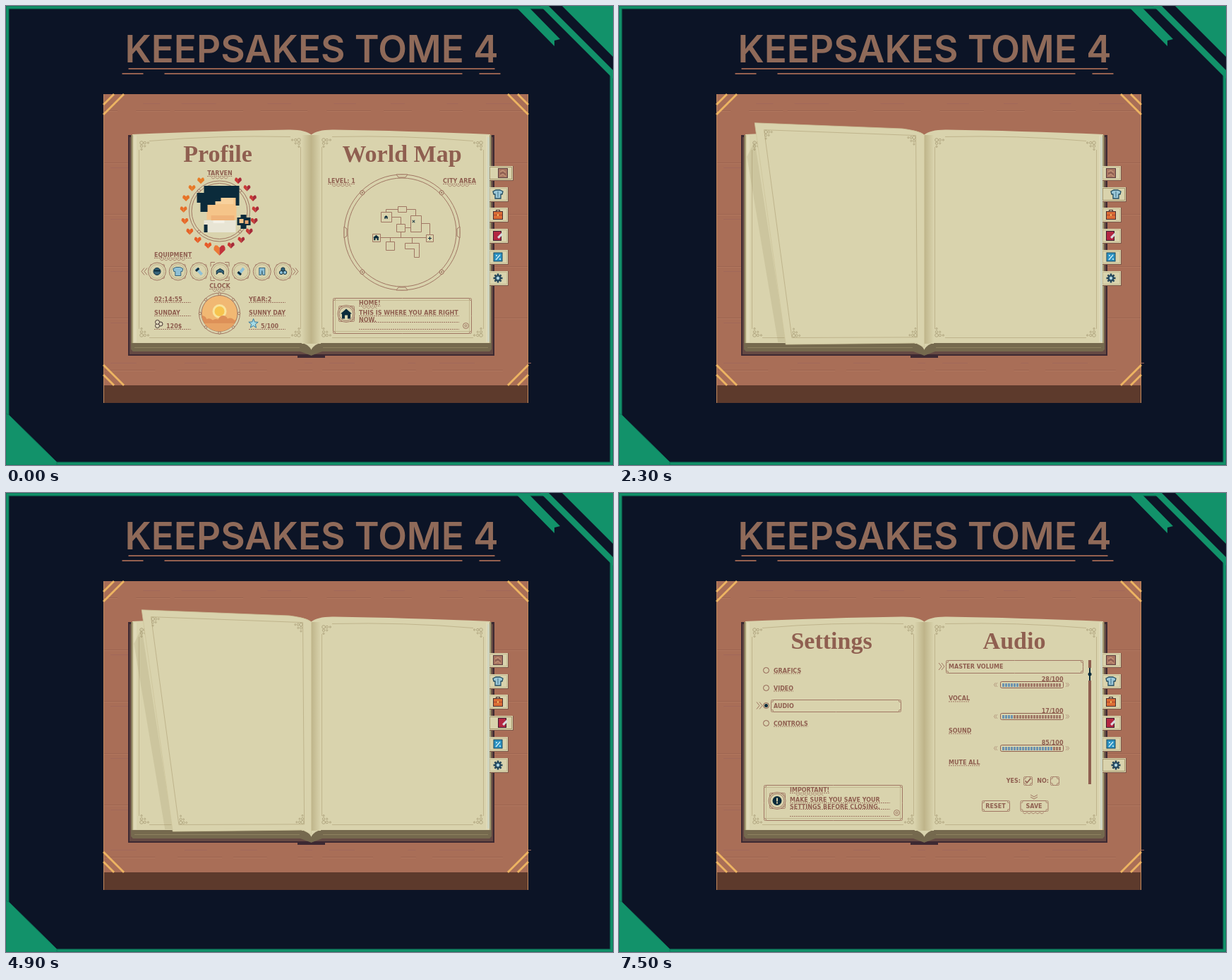
Recreate the animation shown at these times as an HTML page with a canvas. Size 860 by 651 pixels, loop 8000 ms.

```html
<!DOCTYPE html>
<html lang="en">
<head>
<meta charset="utf-8">
<title>Book menu</title>
<style>
html, body { margin: 0; width: 100%; height: 100%; overflow: hidden; background: #0c1426; }
canvas { display: block; width: 100%; height: 100%; }
</style>
</head>
<body>
<canvas id="stage" width="860" height="651"></canvas>
<script>
const g = document.getElementById('stage').getContext('2d');
const INK = '#8f5f50', RULE = '#a07663', PAPER = '#d9d3ad', FAINT = '#bfb48c', DARK = '#0b2b3b',
  GREEN = '#12926a', NIGHT = '#0c1426', GOLD = '#edb462', STEEL = '#36647a', SKY = '#8fc0d6';
const LOOP = 8000, PERIOD = 1300, FIRST = 500, STEP = 100, TURN = 8;
const MID = 432.5, TAU = Math.PI * 2;

// ---------- helpers ----------
const rect = (x, y, w, h, c) => { g.fillStyle = c; g.fillRect(x, y, w, h); };
const times = (n, fn) => { for (let i = 0; i < n; i++) fn(i); };
const polar = (x, y, r, a) => [x + r * Math.cos(a), y + r * Math.sin(a)];
// Runs draw for each quarter turn around x, y.
const quarters = (x, y, draw) => times(4, k => at(x, y, draw, 1, 1, k * TAU / 4));
// Runs draw for the four mirror images around x, y.
const mirrors = (x, y, draw) => times(4, k => at(x, y, draw, k % 2 ? -1 : 1, k > 1 ? -1 : 1));

function at(x, y, draw, sx = 1, sy = sx, turn = 0) {
  g.save(); g.translate(x, y); g.rotate(turn); g.scale(sx, sy); draw(); g.restore();
}
function paint(fill, edge, w = 1) {
  if (fill) { g.fillStyle = fill; g.fill(); }
  if (edge) { g.strokeStyle = edge; g.lineWidth = w; g.stroke(); }
}
function trace(p) {
  g.beginPath();
  for (let i = 0; i < p.length; i += 2) g.lineTo(p[i], p[i + 1]);
}
function line(p, c = RULE, w = 1) { trace(p); paint(null, c, w); }
function poly(p, fill, edge, w) { trace(p); g.closePath(); paint(fill, edge, w); }
function disc(x, y, r, fill, edge, w) { g.beginPath(); g.arc(x, y, r, 0, TAU); paint(fill, edge, w); }
// Closes the right half of a symmetric outline with its mirror image.
function both(half) {
  const p = [...half];
  for (let i = half.length - 2; i >= 0; i -= 2) p.push(-half[i], half[i + 1]);
  return p;
}
function random(seed) {
  return () => (seed = seed * 16807 % 2147483647) / 2147483647;
}
function dots(x, y, w) {
  g.setLineDash([2, 1]); line([x, y + .5, x + w, y + .5], RULE); g.setLineDash([]);
}
function wave(x, y, w) {
  const p = [];
  times(w / 3, i => p.push(x + i * 3, y + i % 2 * 2));
  line(p, RULE, .8);
}
// Small label, y is the middle of the capitals; rule: 1 dotted, 2 dotted and waved.
function label(s, x, y, align = 'left', rule = 0) {
  g.font = 'bold 8px "DejaVu Sans", sans-serif';
  g.textAlign = align; g.fillStyle = INK;
  g.fillText(s, x, y + 3);
  const w = g.measureText(s).width;
  const left = x - (align === 'center' ? w / 2 : align === 'right' ? w : 0);
  if (rule) dots(left, y + 4, w);
  if (rule > 1) wave(left + w * .15, y + 6, w * .7);
}
function title(s, x) {
  g.font = 'bold 34px "Liberation Serif", "Times New Roman", serif';
  g.textAlign = 'center'; g.fillStyle = INK;
  g.fillText(s, x, 221);
}
// Frame with cut corners and a small ring in each.
function box(x, y, w, h) {
  const cx = x + w / 2 + .5, cy = y + h / 2 + .5, a = w / 2, b = h / 2;
  mirrors(cx, cy, () => {
    line([0, b, a - 3, b, a, b - 3, a, 0]);
    disc(a - 1.5, b - 1.5, 1.5, PAPER, RULE, .8);
  });
}
function chevrons(x, y, dir = 1, s = 1) {
  at(x, y, () => times(2, k => line([k * 4, -5, k * 4 + 4, 0, k * 4, 5])), dir * s, s);
}

// ---------- scenery ----------
function backdrop() {
  rect(0, 0, 860, 651, NIGHT);
  g.strokeStyle = '#0d6852'; g.lineWidth = 5; g.strokeRect(2, 2, 856, 647);
  g.strokeStyle = GREEN; g.lineWidth = 3; g.strokeRect(2, 2, 856, 647);
  poly([0, 578, 4, 580, 72, 647, 72, 651, 0, 651], GREEN, '#0d7a5c');
  poly([724, 3, 742, 3, 785, 47, 777, 49, 777, 57], GREEN);
  const slant = (x, c) => poly([x, 0, 860, 0, 860, 860 - x], c);
  slant(757, GREEN); slant(769, NIGHT); slant(788, GREEN);

  g.font = '600 53px Inter, sans-serif';
  g.textAlign = 'center'; g.fillStyle = '#8f6a59';
  g.fillText('KEEPSAKES TOME 4', 433, 80);
  at(432.5, 0, () => {
    const c = '#94604f';
    rect(-259, 88, 519, 2, c);
    rect(-208, 95, 422, 2, c);
    for (const side of [-1, 1]) rect(side * 253 - 15, 95, 30, 2, c);
  });
}
function desk() {
  const rnd = random(11);
  rect(138, 125, 602, 438, '#a96e57');
  times(6, k => {
    const y = Math.round(148 + k * 73.5), edge = k % 5 === 0;
    for (let x = 138; x < 735;) {
      const w = edge ? 20 + rnd() * 90 : 602;
      rect(x, y, Math.min(w, 740 - x), 1, '#9c6450');
      rect(x, y + 1, Math.min(w, 740 - x), 1, '#b2775e');
      rect(x + 10, y + (edge ? -10 : 7), Math.min(w * .5, 730 - x), 1, '#a1685a');
      x += w + 4 + rnd() * 50;
    }
  });
  rect(138, 538, 602, 25, '#5d3a2c');
  for (const x of [138, 739]) rect(x, 125, 1, 438, '#c48a5c');
  mirrors(439, 331.5, () => {
    for (const d of [15, 29]) line([301 - d, 206.5, 301, 206.5 - d], GOLD, 2.8);
  });
}
// Rings packed into a corner, shrinking outwards.
function ornament(x, y, sx, sy) {
  at(x, y, () => times(3, i => times(3 - i, j =>
    disc(3 + i * 4.7, 3 + j * 4.7, 2.3 - (i + j) * .6, null, '#aca17b', .9))), sx, sy);
}
function halfBook() {
  rect(173, 183, 260, 313, '#3d2932');
  rect(175, 186, 258, 308, '#654943');
  rect(413, 494, 20, 5, '#3d2932');
  poly([177, 183, 433, 183, 433, 496, 417, 490, 180, 490, 177, 487], '#75694e');
  rect(182, 484, 234, 1, '#8d8160');
  g.beginPath();
  g.moveTo(179, 182);
  g.quadraticCurveTo(300, 177, 400, 175.5);
  g.quadraticCurveTo(424, 175, 433, 183);
  g.lineTo(433, 488);
  g.quadraticCurveTo(428, 479, 418, 478);
  g.lineTo(179, 478);
  paint(PAPER);
  rect(178, 183, 2, 295, '#a59a73'); rect(181, 184, 4, 293, '#dfd9b7');
  const gutter = g.createLinearGradient(419, 0, 433, 0);
  gutter.addColorStop(0, PAPER); gutter.addColorStop(1, '#bdb388');
  rect(419, 183, 14, 296, gutter);
  g.beginPath();
  g.moveTo(203, 191.5); g.quadraticCurveTo(300, 183, 403, 185.5);
  g.moveTo(417.5, 200); g.lineTo(417.5, 458);
  g.moveTo(403, 470.5); g.lineTo(203, 470.5);
  g.moveTo(188.5, 458); g.lineTo(188.5, 204);
  paint(null, FAINT);
  for (const [x, top, sx] of [[189, 191, 1], [418, 187, -1]]) {
    ornament(x, top, sx, 1); ornament(x, 470, sx, -1);
  }
}
function book() {
  halfBook();
  at(MID * 2, 0, halfBook, -1, 1);
  rect(682, 186, 3, 290, '#cfd5c0');
}

// ---------- icons, drawn around 0,0 ----------
const shirt = both([3, -6, 7, -4, 6, 0, 4, 0, 4, 6]);
const house = () => poly(both([0, -7, 8, 0, 6, 0, 6, 7, 2, 7, 2, 2]), DARK);
function gear() {
  times(4, k => at(0, 0, () => rect(-1.3, -6.5, 2.6, 13, '#25465a'), 1, 1, k * TAU / 8));
  disc(0, 0, 4.5, '#25465a'); disc(0, 0, 2.4, SKY); disc(0, 0, 1, '#e6edde');
}
function tile(fill, edge, a = 6, b = a) {
  rect(-a - 1, -b - 1, a * 2 + 2, b * 2 + 2, edge);
  rect(-a, -b, a * 2, b * 2, fill);
}
const TABS = [
  () => {
    tile('#a87561', '#5b3c3e');
    times(3, k => line([-4, k * 3 - 2, 0, k * 3 - 4, 4, k * 3 - 1], k % 2 ? '#744a44' : '#cfa283'));
  },
  () => { poly(shirt, '#9cc8d8', '#234c60', 1.3); rect(-.5, -4, 1, 8, '#3c7188'); },
  () => {
    rect(-3, -7, 6, 3, '#4a2d2f'); rect(-2, -6, 4, 2, PAPER);
    at(0, 1, () => tile('#db6c35', '#4a2d2f', 6, 5));
    rect(-6, 0, 12, 1, '#a8482c'); rect(-1, -1, 2, 3, '#f1b25c');
  },
  () => {
    at(-1, 0, () => tile('#b32742', '#3d1b30', 5, 6));
    at(3, 0, () => rect(-1.5, -4, 3, 8, '#d9dbe0'), 1, 1, TAU / 8);
  },
  () => {
    tile('#2d93c3', '#17445f', 5.5);
    line([-3, 4, 3, -3], '#d6eef4', 1.3);
    for (const d of [-3, 2]) rect(d, d, 2, 2, '#a8dcec');
  },
  gear
];
function tabs(active) {
  TABS.forEach((icon, k) => {
    const y = Math.round(237 + k * 29.7), out = k === active ? 7 : 0;
    rect(685, y - 10, 27 + out, 21, '#7d5748');
    rect(685, y - 10, 26 + out, 20, PAPER);
    g.strokeStyle = out ? '#a8986f' : '#c6bb92'; g.lineWidth = 1;
    g.strokeRect(685.5, y - 8.5, 24 + out, 17);
    at(697 + out, y, icon);
  });
}
const blade = turn => () => at(0, 0, () => { rect(-2, -6, 4, 12, SKY); rect(-3, 2, 6, 3, DARK); }, 1, 1, turn);
const GEAR = [
  () => { disc(0, 0, 5, STEEL, DARK); rect(-4, -2, 8, 2, DARK); },
  () => poly(shirt, SKY, STEEL),
  blade(2.4),
  () => poly(both([0, -4, 5, -1, 5, 4, 2, 1]), STEEL, DARK),
  blade(.7),
  () => poly(both([0, -5, 4, -5, 4, 5, 1, 5, 0, -1]), SKY, STEEL),
  () => times(3, k => disc(...polar(0, 0, 3, k * TAU / 3 - 1.6), 2.6, k ? SKY : STEEL, DARK))
];
function heart(x, y, left, right, s) {
  at(x, y, () => [left, right].forEach((c, k) =>
    at(0, 0, () => poly([0, -2, 2, -4, 4, -4, 5, -2, 5, 0, 0, 5], c), k ? 1 : -1, 1)), s);
}
function panel(x, icon, head, a, b) {
  box(x, 414, 196, 50);
  g.strokeStyle = FAINT; g.lineWidth = .8; g.strokeRect(x + 3.5, 417.5, 190, 44);
  box(x + 8, 425, 22, 22);
  for (const r of [12, 10]) disc(x + 19, 436.5, r, PAPER, RULE);
  at(x + 19, 436.5, icon);
  label(head, x + 37, 421, 'left', 2);
  label(a, x + 37, 435); label(b, x + 37, 445);
  times(3, k => dots(x + 37, 439 + k * 9.5 | 0, 142));
  for (const r of [4, 1.5]) disc(x + 188.5, 453.5, r, null, RULE);
}

// ---------- pages ----------
function portrait(cx, cy) {
  for (const r of [43, 39.5]) disc(cx, cy, r, PAPER, RULE);
  quarters(cx, cy, () => disc(29, 29, 2, PAPER, RULE));
  at(cx, cy, () => {
    rect(-18, -20, 42, 32, '#f5c489'); rect(-6, -20, 26, 10, '#f8d19c'); rect(-12, 6, 33, 9, '#efb37a');
    rect(-22, 13, 45, 17, '#e8e5d5'); rect(-22, 19, 5, 11, DARK); rect(-9, 13, 16, 4, '#f4f1e5');
    poly([-22, -36, 28, -36, 28, -8, 23, -8, 23, -19, 2, -19, 2, -14, -6, -14, -6, -9, -17, -9,
      -17, 1, -27, 1, -27, -12, -32, -12, -32, -26, -22, -26], DARK);
    rect(25, 9, 19, 11, DARK); rect(30, 5, 8, 20, DARK);
    rect(28, 11, 6, 6, '#f5c489'); rect(36, 13, 5, 5, '#e5a36d');
  });
  for (let k = 1; k < 9; k++) {
    const [x, y] = polar(cx, cy, 51, TAU / 4 + k * .3246), warm = `hsl(${14 + k * 1.6} 80% 53%)`;
    heart(x, y, warm, warm, .95);
    heart(2 * cx - x, y, '#c93a36', '#a62b39', .95);
  }
  heart(cx, cy + 55, '#ec7836', '#c2323a', 1.6);
}
function clock(x, y) {
  disc(x, y, 29, PAPER, RULE);
  times(8, k => disc(...polar(x, y, 27.5, k * TAU / 8), 1.8, PAPER, RULE));
  disc(x, y, 25.5, '#f1b873', RULE);
  g.save();
  g.clip();
  disc(x, y - 3, 10, '#f8e39c'); disc(x, y - 3, 7, '#f6c44e');
  times(6, k => disc(x - 25 + k * 10, y + 13 - 3 * Math.cos(k * 2), 7, '#dd9058'));
  rect(x - 26, y + 14, 52, 13, '#e7a365');
  g.restore();
}
function profile() {
  title('Profile', 300);
  label('TARVEN', 303, 237, 'center', 2);
  portrait(302.5, 291);
  label('EQUIPMENT', 210, 353, 'left', 2);
  GEAR.forEach((draw, k) => {
    const x = 214 + k * 29.75;
    box(x - 10, 366, 20, 20);
    disc(x, 376.5, 12.5, PAPER, RULE); disc(x, 376.5, 10, null, FAINT);
    at(x, 376.5, draw);
  });
  mirrors(303, 376.5, () => line([7, 13, 13, 13, 13, 7]));
  chevrons(200, 376.5, -1); chevrons(406, 376.5);
  label('CLOCK', 303, 397, 'center', 2);
  clock(302.5, 436);
  const facts = [['02:14:55', 'SUNDAY', '120$'], ['YEAR:2', 'SUNNY DAY', '5/100']];
  facts.forEach((list, i) => list.forEach((s, k) => {
    const x = 210 + i * 134, y = 416 + k * 19;
    label(s, x + (k > 1 ? 17 : 0), y); dots(x, y + 4, 52);
  }));
  times(3, k => disc(...polar(216, 451, 3, k * TAU / 3), 3, '#dfd8bc', '#43322e'));
  const star = [];
  times(10, k => star.push(...polar(350.5, 450.5, k % 2 ? 3 : 7, k * TAU / 10 - .3)));
  poly(star, '#a5dbe6', '#397b9d');
}
// Rooms as x, y, w, h; a link runs along from its first room, then up or down to its second.
const ROOMS = {
  A: [519, 323, 11, 11], B: [538, 334, 12, 12], C: [531, 292, 15, 14], D: [555, 284, 12, 8],
  E: [573, 297, 15, 23], F: [553, 309, 12, 11], G: [595, 324, 10, 10], H: [565, 336, 20, 8]
};
const LINKS = ['DC', 'DE', 'CF', 'FE', 'EG', 'AG', 'AF', 'AB', 'AH'];
function worldMap() {
  title('World Map', 561);
  label('LEVEL: 1', 456, 248, 'left', 2);
  label('CITY AREA', 666, 248, 'right', 2);
  for (const r of [82, 77]) disc(561, 321, r, null, RULE);
  quarters(561, 321, () => {
    poly(both([8, -82, 5, -78]), PAPER, RULE);
    g.rotate(TAU / 8);
    disc(0, -79.5, 3, PAPER, RULE); disc(0, -79.5, 1, INK);
  });
  const centre = id => {
    const [x, y, w, h] = ROOMS[id];
    return [Math.floor(x + w / 2) + .5, Math.floor(y + h / 2) + .5];
  };
  for (const [a, b] of LINKS) {
    const [x, y] = centre(a), [u, v] = centre(b);
    line([x, y, u, y, u, v]);
  }
  const room = (x, y, w, h) => { g.beginPath(); g.rect(x + .5, y + .5, w, h); paint(PAPER, RULE); };
  Object.values(ROOMS).forEach(r => room(...r));
  room(578, 344, 7, 12); rect(579, 344, 6, 1, PAPER);
  at(...centre('A'), house, .55); at(...centre('C'), house, .35);
  const cross = () => { line([-2.5, 0, 2.5, 0], DARK); line([0, -2.5, 0, 2.5], DARK); };
  at(...centre('G'), cross);
  at(577.5, 305.5, cross, 1, 1, TAU / 8);
  panel(463, house, 'HOME!', 'THIS IS WHERE YOU ARE RIGHT', 'NOW.');
}
// Pages for the middle tabs: slots on the left, entries on the right.
const COLLECTIONS = [
  ['Outfit', 'Closet', 'SHIRT', 'A LIGHT SHIRT TO WEAR.'],
  ['Backpack', 'Items', 'BAG', 'EVERYTHING YOU CARRY.'],
  ['Journal', 'Quests', 'NOTES', 'WRITE DOWN YOUR TASKS.'],
  ['Recipes', 'Crafting', 'PLAN', 'ALL YOU NEED TO BUILD.']
];
function collection(k) {
  const [left, right, head, note] = COLLECTIONS[k - 1];
  title(left, 302); title(right, 561);
  times(20, i => {
    const x = 226 + i % 5 * 38, y = 258 + Math.floor(i / 5) * 36;
    box(x - 13, y - 13, 26, 26);
    if (i < 7) at(x, y, GEAR[(i + k) % 7]);
  });
  times(5, i => {
    const y = 251 + i * 32;
    box(463, y - 9, 194, 18); dots(485, y + 4, 140);
    at(474, y, GEAR[(i + k) % 7], .8);
  });
  for (const x of [205, 463]) panel(x, TABS[k], head, note, '');
}
const MENU = ['GRAFICS', 'VIDEO', 'AUDIO', 'CONTROLS'];
const OPTIONS = [
  ['Grafics', ['TEXTURES', 'SHADOWS', 'DETAIL', 'FULL SCREEN'], [60, 45, 70]],
  ['Video', ['BRIGHTNESS', 'CONTRAST', 'GAMMA', 'SUBTITLES'], [50, 65, 40]],
  ['Audio', ['MASTER VOLUME', 'VOCAL', 'SOUND', 'MUTE ALL'], [28, 17, 85]]
];
const alert = () => {
  disc(0, 0, 6.5, DARK);
  rect(-1, -4, 2, 5, PAPER); rect(-1, 2, 2, 2, PAPER);
};
function menu(sel) {
  title('Settings', 301);
  MENU.forEach((s, k) => {
    const y = 251 + k * 25, on = k === sel;
    disc(208.5, y + .5, 4, null, INK);
    if (on) {
      box(215, y - 8, 184, 17); chevrons(195, y + .5);
      disc(208.5, y + .5, 2.5, DARK);
    }
    label(s, 219, y + .5, 'left', on ? 0 : 1);
  });
  panel(205, alert, 'IMPORTANT!', 'MAKE SURE YOU SAVE YOUR', 'SETTINGS BEFORE CLOSING.');
}
function slider(y, v) {
  label(v + '/100', 629.5, y - 8, 'right');
  g.beginPath(); g.roundRect(540.5, y - 4.5, 89, 9, 2); paint(null, INK);
  times(21, i => rect(543 + i * 4, y - 2, 3, 5, i < v * .21 ? '#6c93b0' : '#a17968'));
  chevrons(536, y, -1, .6); chevrons(633, y, 1, .6);
}
function options([head, names, values]) {
  title(head, 560);
  box(463, 237, 194, 18); chevrons(453, 246);
  names.forEach((s, k) => label(s, 467, 246 + k * 45.4, 'left', k ? 1 : 0));
  values.forEach((v, k) => slider(Math.round(271.5 + k * 45.4), v));
  label('YES:', 569, 408, 'right'); label('NO:', 609, 408, 'right');
  for (const x of [573, 611]) box(x, 402, 12, 12);
  line([575.5, 408, 578, 411, 583, 405], INK, 1.6);
  for (const [s, x] of [['RESET', 533.5], ['SAVE', 588]]) {
    box(x - 19.5, 436, 39, 15); label(s, x, 443.5, 'center');
  }
  wave(572, 453, 33);
  for (const y of [428, 431]) line([583, y, 588, y + 3, 593, y]);
  rect(665, 237, 4, 176, INK);
  rect(664, 248, 6, 18, PAPER); rect(666, 248, 2, 18, DARK);
  disc(667, 257, 2.5, DARK);
}

// ---------- turning leaf ----------
function leaf(a) {
  const c = Math.cos(a), s = Math.sin(a), dir = c < 0 ? -1 : 1;
  const tx = 252 * c - 44 * s, ty = 181 - 43 * s ** 1.5;
  const bx = 252 * c + 44 * s, by = 479, shade = dir * 11;
  at(MID, 0, () => {
    poly([tx, ty + 26, tx + shade, ty + 48, bx + shade, 477, bx, 477], 'rgba(150,138,96,.2)');
    g.beginPath();
    g.moveTo(0, 183);
    g.quadraticCurveTo(tx * .03, 177, tx * .13, 175 - 2 * s);
    g.lineTo(tx, ty); g.lineTo(bx, by + 1); g.lineTo(bx * .06, 478); g.lineTo(0, 484);
    g.closePath();
    paint(PAPER, '#cdc49b', .8);
    const spot = (u, v) => {
      const x = tx + (bx - tx) * v, y = ty + (by - ty) * v, inner = 175 + 303 * v;
      return [x * u, inner + (y - inner) * u];
    };
    const near = .05, far = .95, up = .03, low = .973;
    poly([spot(near, up), spot(far, up), spot(far, low), spot(near, low)].flat(), null, FAINT);
    for (const u of [near, far]) for (const v of [up, low])
      ornament(...spot(u, v), (u === near ? dir : -dir) * Math.abs(c), v === up ? 1 : -1);
  });
}

// ---------- timeline ----------
function render(t) {
  const turn = Math.floor((t - FIRST) / PERIOD);
  const step = Math.floor((t - FIRST - turn * PERIOD) / STEP);
  const turning = turn >= 0 && turn < 5 && step < TURN;
  const page = turning ? turn : Math.min(turn + 1, 5);
  backdrop(); desk(); book(); tabs(page);
  if (turning) {
    if (step > 0 && step < 6) leaf(step * Math.PI / 6);
  } else if (page === 0) {
    profile(); worldMap();
  } else if (page === 5) {
    const sel = Math.max(0, Math.floor((t - 6500) / 500));
    menu(sel); options(OPTIONS[sel]);
  } else {
    collection(page);
  }
}
const start = performance.now();
function tick() {
  render((performance.now() - start) % LOOP);
  requestAnimationFrame(tick);
}
tick();
</script>
</body>
</html>
```
